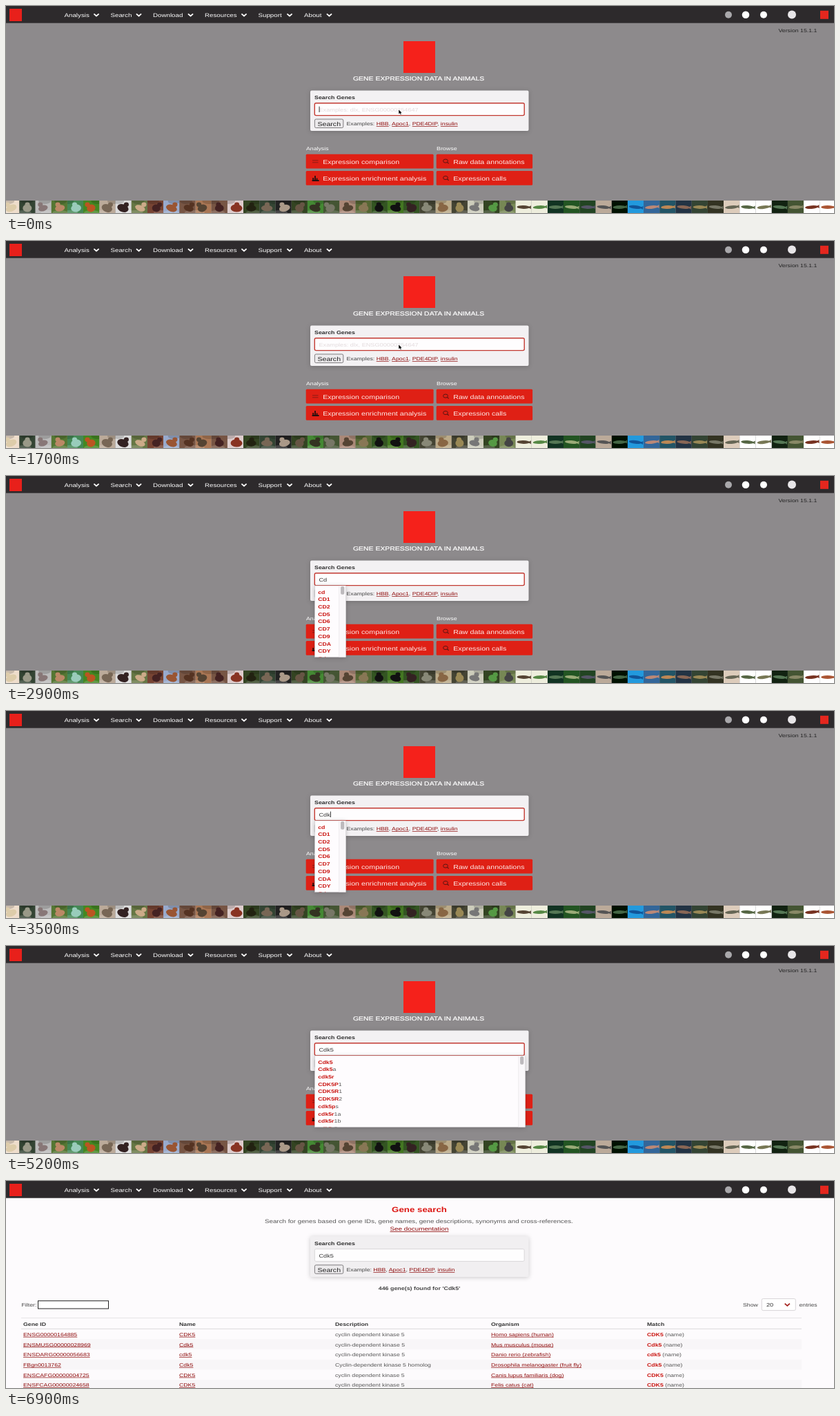
An HTML page that plays this animation: 1200x300 px, repeating every 7 s.

```html
<!DOCTYPE html>
<html lang="en">
<head>
<meta charset="utf-8">
<title>Gene search</title>
<style>
html, body { margin: 0; width: 100%; height: 100%; overflow: hidden; }
svg { display: block; width: 1200px; height: 300px; }
text { font-family: "Liberation Sans", Arial, sans-serif; white-space: pre; text-rendering: geometricPrecision; }
.b { font-weight: bold; }
.u { fill: #8e0a0a; text-decoration: underline; }
.r { fill: #c9130f; font-weight: bold; }
.box { filter: drop-shadow(0 1px 3px rgba(0, 0, 0, .2)); }
</style>
</head>
<body>
<svg id="stage" viewBox="0 0 1200 300"></svg>
<script>
const LOOP = 7000, RESULTS_AT = 5300, BLUR_AT = 5100;
const KEYS = [2200, 2400, 3300, 3800];
const WORD = 'Cdk5';
const WIDE = 1.24; // the page is shown wider than tall
const SMALL = 8.76, BODY = 9.75;
const INK = '#444', RED = '#df2015';
const stage = document.getElementById('stage');

function el(parent, tag, attrs, text) {
  const node = document.createElementNS('http://www.w3.org/2000/svg', tag);
  for (const key in attrs) node.setAttribute(key, attrs[key]);
  if (text) node.textContent = text;
  parent.appendChild(node);
  return node;
}
const group = parent => el(parent, 'g', {});
const rect = (p, x, y, width, height, fill, more) => el(p, 'rect', { x, y, width, height, fill, ...more });
const dot = (p, cx, cy, r, fill) => el(p, 'circle', { cx, cy, r, fill });
const oval = (p, cx, cy, rx, ry, fill, more) => el(p, 'ellipse', { cx, cy, rx, ry, fill, ...more });
const path = (p, d, stroke, width) => el(p, 'path', { d, stroke, 'stroke-width': width, fill: 'none' });

// parts: a string, or a list of [text, class]
function label(p, x, y, parts, size, fill, more) {
  const t = el(p, 'text', {
    transform: `translate(${x} ${y}) scale(${WIDE} 1)`,
    'font-size': size / WIDE, fill, ...more
  });
  if (typeof parts === 'string') t.textContent = parts;
  else for (const [s, cls] of parts) el(t, 'tspan', { class: cls || '' }, s);
  return t;
}
const chevron = (p, x, y, color) => path(p, `M${x - 3.6} ${y - 1.7}l3.6 3.2l3.6-3.2`, color, 1.8);

function navBar(p) {
  rect(p, 0, 0, 1200, 24.7, '#2d2a2c');
  rect(p, 5, 4, 18, 18, '#e8201b');
  const items = [['Analysis', 84.5, 131], ['Search', 151.5, 192.5], ['Download', 213, 267.5],
    ['Resources', 288, 345], ['Support', 365.5, 411], ['About', 432, 468.5]];
  for (const [name, x, cx] of items) {
    label(p, x, 15.6, name, BODY, '#fff');
    chevron(p, cx, 13, '#fff');
  }
  dot(p, 1047, 12.7, 5, '#a9a8ab');
  dot(p, 1072, 12.7, 5.3, '#fff');
  dot(p, 1098, 12.7, 5, '#fff');
  dot(p, 1139, 12.5, 6, '#e8e6e8');
  rect(p, 1180, 6.8, 12, 12, '#e5271e');
}

function searchBox(p, y, lead, fill, edge) {
  rect(p, 441, y, 316.5, 58.6, fill, { rx: 2, class: 'box' });
  label(p, 447, y + 12.3, 'Search Genes', 8.85, '#2b2b2b', { class: 'b' });
  rect(p, 447.3, y + 18.3, 303.9, 17.8, '#fefdfe', { rx: 2, stroke: edge, 'stroke-width': edge === '#d9d7d9' ? 1 : 1.4 });
  rect(p, 447.4, y + 41.5, 41.4, 12.5, '#eceaec', { rx: 2, stroke: '#747274', 'stroke-width': .9 });
  label(p, 451.5, y + 51.3, 'Search', 10.6, '#222');
  const links = ['HBB', 'Apoc1', 'PDE4DIP', 'insulin'];
  const parts = [[lead + ': ']];
  links.forEach((s, i) => { if (i) parts.push([', ']); parts.push([s, 'u']); });
  label(p, 493.5, y + 50.7, parts, SMALL, INK);
}

// one tile per animal: ground and body tones
const TILES = ('edc dca,343 998,bbb 877,573 b86,485 9cb,482 b52,ba9 765,ddd 322,674 ca8,743 422,9ac 953,754 532,' +
  'a75 543,754 422,dcc 832,342 221,343 765,222 a98,342 654,483 332,453 776,a87 543,563 875,352 111,472 111,' +
  '352 322,443 887,ba8 864,443 985,ccb 777,342 594,785 444,eed 543,eed 584,132 575,252 9a7,242 556,ba9 555,' +
  '010 464,29d 159,369 b87,256 b85,234 865,343 985,332 776,dcb 665,fff 564,fff 775,121 575,453 886,fff 732,fff a53').split(',');

function photoStrip(p) {
  let seed = 11;
  const rnd = (a, b) => a + (b - a) * (seed = seed * 16807 % 2147483647) / 2147483647;
  TILES.forEach((tones, i) => {
    const [ground, body] = tones.split(' ').map(s => '#' + s);
    const tile = el(p, 'svg', { x: -4 + i * 23.2, y: 282, width: 23.3, height: 18 });
    rect(tile, 0, 0, 24, 18, ground);
    const tilt = rnd(-22, 22), cx = rnd(10, 13.5);
    if (i > 31) {
      const fish = el(tile, 'g', { transform: `rotate(${tilt / 3} 12 9)` });
      oval(fish, 11.5, 9.5, 9.5, 2.4, body);
      el(fish, 'path', { d: 'M18 9.5l4.5-2.6v5z', fill: body });
      return;
    }
    oval(tile, rnd(0, 23), 1, 9, 4, '#000', { opacity: .16 });
    oval(tile, rnd(0, 23), 17, 11, 3, '#fff', { opacity: .16 });
    oval(tile, cx, 11, rnd(6, 8.5), rnd(4.2, 6), body, { transform: `rotate(${tilt} ${cx} 11)` });
    oval(tile, cx + tilt / 4, 5.8, 3.6, 3.4, body);
  });
}

function pill(p, x, y, w, name) {
  rect(p, x - .3, y - .3, w + .4, 20.8, RED, { rx: 1.5 });
  label(p, x + 24.2, y + 13.6, name, 10.68, '#fdecea');
}
function lens(p, x, y) {
  oval(p, x, y, 3.4, 2.6, 'none', { stroke: '#5a1512', 'stroke-width': 1 });
  path(p, `M${x + 2.3} ${y + 1.8}l2.4 2`, '#5a1512', 1.2);
}

// home page
const home = group(stage);
rect(home, 0, 0, 1200, 300, '#8d8a8c');
label(home, 1119.5, 38.4, 'Version 15.1.1', SMALL, '#222');
rect(home, 576, 51, 46, 46, '#f5211b');
label(home, 503, 108.3, 'GENE EXPRESSION DATA IN ANIMALS', 10.44, '#fff', { stroke: '#fff', 'stroke-width': .2 });
searchBox(home, 122.5, 'Examples', '#f3f1f3', '#c33a32');
const hint = label(home, 453.5, 152.7, 'Examples: dlx, ENSG00000254647', 9.18, '#e2dadc');
const typed = label(home, 453.5, 152.7, '', 9.18, '#333');
const caret = rect(home, 453.6, 145.6, .9, 8.4, '#222');
label(home, 435, 208.8, 'Analysis', SMALL, '#fff');
label(home, 624, 208.8, 'Browse', 8.9, '#fff');
pill(home, 435, 215, 184.5, 'Expression comparison');
pill(home, 435, 239.2, 184.5, 'Expression enrichment analysis');
pill(home, 624, 215, 139, 'Raw data annotations');
pill(home, 624, 239.2, 139, 'Expression calls');
path(home, 'M444 223.8h8.5M444 226.8h8.5', '#8c1a15', 1);
path(home, 'M445.2 253v-4M448 253v-7M450.6 253v-3.5M443.6 253h10', '#26100f', 1.8);
lens(home, 637, 224.6);
lens(home, 637, 249);
photoStrip(home);
const pointer = el(home, 'path', {
  d: 'M569 150v6.6l1.6-1.2l1.2 2.2l1.3-.5l-1-2.2h2z',
  fill: '#000', stroke: '#fff', 'stroke-width': .5
});

function menu(width, rows) {
  const g = group(home);
  const clip = el(g, 'clipPath', { id: 'menu' + width });
  rect(clip, 447, 159, width + 1, 103.4);
  rect(g, 447.5, 159, width, 103.5, '#fefcfe', { stroke: '#c9c6c9', 'stroke-width': .6, class: 'box' });
  const right = 447.5 + width;
  rect(g, right - 9.8, 159.3, 9.5, 103, '#faf8fa');
  rect(g, right - 10, 159.3, .6, 103, '#e6e3e6');
  rect(g, right - 7.4, 160, 5.2, 11.8, '#bdbabd', { rx: 2 });
  const list = el(g, 'g', { 'clip-path': `url(#menu${width})` });
  rows.forEach((row, i) => {
    const [hit, rest] = row.split('|');
    label(list, 452.2, 170.6 + i * 10.7, [[hit, 'r'], [rest || '']], SMALL, '#555');
  });
  return g;
}
const shortMenu = menu(45, ['cd', 'CD1', 'CD2', 'CD5', 'CD6', 'CD7', 'CD9', 'CDA', 'CDY', 'Cdc']);
const longMenu = menu(305, ['Cdk5', 'Cdk5|a', 'cdk5r', 'CDK5P|1', 'CDK5R|1', 'CDK5R|2',
  'cdk5p|s', 'cdk5r|1a', 'cdk5r|1b', 'cdk5r|2a']);

// results page
const results = group(stage);
const middle = { 'text-anchor': 'middle', class: 'b' };
rect(results, 0, 0, 1200, 300, '#fdfbfd');
label(results, 599, 45, 'Gene search', 13.3, '#dc1511', middle);
label(results, 375, 60.5, 'Search for genes based on gene IDs, gene names, gene descriptions, synonyms and cross-references.', 9.79, '#555');
label(results, 556.5, 72, [['See documentation', 'u']], 9.88, INK);
searchBox(results, 80.3, 'Example', '#f1eff1', '#d9d7d9');
label(results, 453.5, 110.6, WORD, 9.18, '#333');
label(results, 599, 157.6, "446 gene(s) found for 'Cdk5'", 8.9, INK, middle);
label(results, 22.5, 182.2, 'Filter:', SMALL, INK);
rect(results, 46.5, 173.7, 102, 11.3, '#fff', { stroke: '#222', 'stroke-width': 1 });
label(results, 1068, 182.2, 'Show', SMALL, INK);
rect(results, 1095.3, 170.6, 49, 17, '#fff', { rx: 2, stroke: '#d3d1d3', 'stroke-width': .9 });
label(results, 1102, 182.3, '20', 9.18, '#333');
chevron(results, 1132.3, 179.4, '#a3211c');
label(results, 1149.5, 182.2, 'entries', SMALL, INK);

const COLS = [25, 251, 477, 703, 929];
rect(results, 22, 198.2, 1131, .7, '#dedcde');
['Gene ID', 'Name', 'Description', 'Organism', 'Match'].forEach((s, i) =>
  label(results, COLS[i], 209.6, s, SMALL, '#333', { class: 'b' }));
[
  ['ENSG00000164885', 'CDK5', 'cyclin dependent kinase 5', 'Homo sapiens (human)'],
  ['ENSMUSG00000028969', 'Cdk5', 'cyclin-dependent kinase 5', 'Mus musculus (mouse)'],
  ['ENSDARG00000056683', 'cdk5', 'cyclin-dependent kinase 5', 'Danio rerio (zebrafish)'],
  ['FBgn0013762', 'Cdk5', 'Cyclin-dependent kinase 5 homolog', 'Drosophila melanogaster (fruit fly)'],
  ['ENSCAFG00000004725', 'CDK5', 'cyclin dependent kinase 5', 'Canis lupus familiaris (dog)'],
  ['ENSFCAG00000024658', 'CDK5', 'cyclin dependent kinase 5', 'Felis catus (cat)']
].forEach((row, i) => {
  const y = 214.6 + i * 14.7;
  if (i % 2) rect(results, 22, y, 1131, 14.7, '#f8f6f8');
  row.forEach((s, c) => label(results, COLS[c], y + 10.2, [[s, c === 2 ? '' : 'u']], SMALL, '#555'));
  label(results, COLS[4], y + 10.2, [[row[1], 'r'], [' (name)']], SMALL, '#555');
});
rect(results, 22, 213.8, 1131, .9, '#d6d4d6');

navBar(stage);

const show = (node, on) => node.setAttribute('visibility', on ? 'visible' : 'hidden');

function draw(t) {
  const atHome = t < RESULTS_AT;
  home.style.display = atHome ? '' : 'none';
  results.style.display = atHome ? 'none' : '';
  if (!atHome) return;
  const count = KEYS.filter(k => t >= k).length;
  const lastKey = count ? KEYS[count - 1] : 0;
  typed.textContent = WORD.slice(0, count);
  const width = count ? typed.getComputedTextLength() * WIDE : 0;
  caret.setAttribute('x', 453.6 + width);
  show(caret, t < BLUR_AT && (t - lastKey) % 1000 < 500);
  show(hint, !count);
  show(pointer, !count);
  show(shortMenu, t >= 2600 && t < 3900);
  show(longMenu, t >= 3900);
}

let start;
function tick(now) {
  if (start === undefined) start = now;
  draw((now - start) % LOOP);
  requestAnimationFrame(tick);
}
draw(0);
requestAnimationFrame(tick);
</script>
</body>
</html>
```
